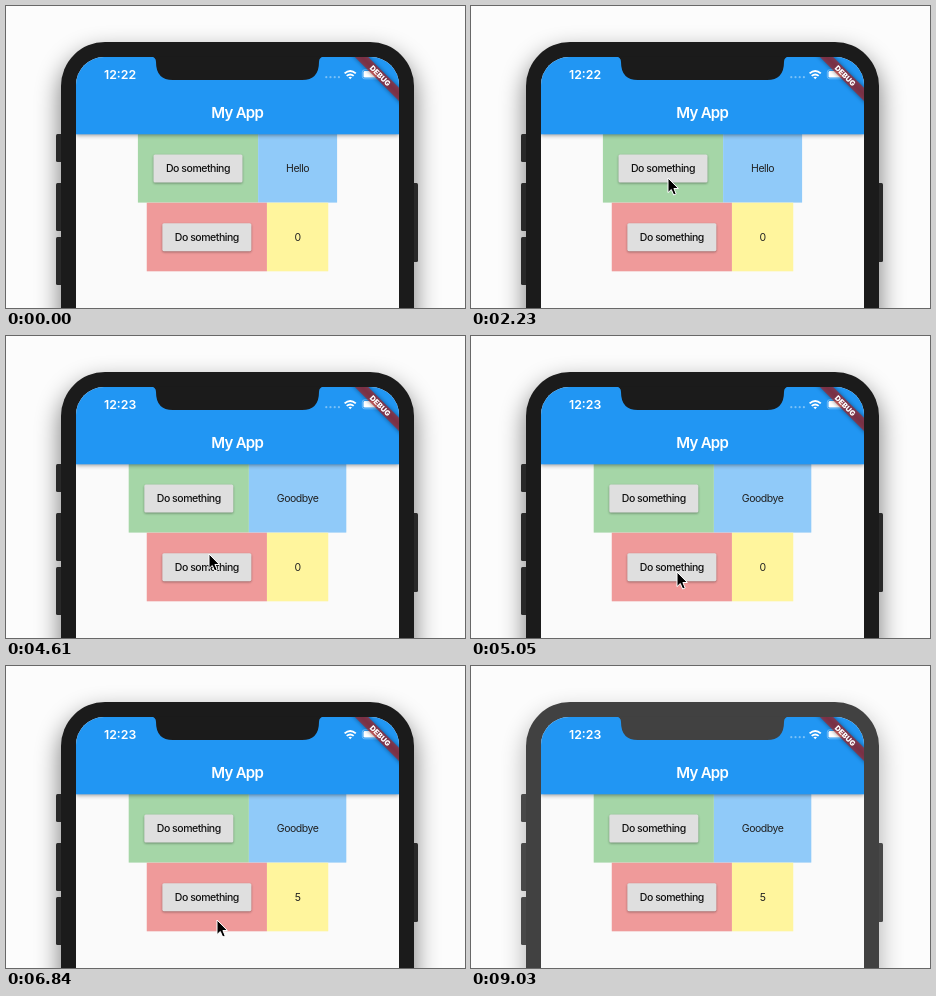
Recreate the animation shown at these times as an HTML page. Size 459 by 302 pixels, loop 9.13 s.

```html
<!DOCTYPE html>
<html lang="en">
<head>
<meta charset="utf-8">
<title>My App</title>
<style>
  html, body { margin: 0; width: 100%; height: 100%; overflow: hidden; background: #fcfcfc; }
  svg { display: block; width: 459px; height: 302px; font-family: Inter, Roboto, sans-serif; }
  text { text-anchor: middle; }
  .label { font-size: 10.5px; letter-spacing: -.47px; fill: #212121; }
  .button-label { font-weight: 500; fill: #111; }
  .button { fill: #dfdfdf; filter: drop-shadow(0 1px 1px rgba(0, 0, 0, .35)); }
  .title { font-size: 15px; font-weight: 600; letter-spacing: -.75px; fill: #fff; }
  .clock { font-size: 12.3px; font-weight: 600; fill: #fff; text-anchor: start; }
  .debug { font-size: 7.4px; font-weight: 900; fill: #fff; }
  .body { fill: #1b1b1b; }
  .key { fill: #292929; }
  .bar { filter: drop-shadow(0 1.5px 2px rgba(0, 0, 0, .4)); }
  .shadow { fill: #000; filter: blur(12px); opacity: .5; }
  .band { fill: #b71c1c; fill-opacity: .63; }
  .band-shadow { fill: #000; opacity: .45; filter: blur(2px); }
</style>
</head>
<body>
<svg viewBox="0 0 459 302">
  <defs>
    <clipPath id="screen"><rect x="70" y="51" width="323" height="300" rx="28"/></clipPath>
  </defs>

  <rect class="shadow" x="54" y="46" width="355" height="330" rx="44"/>
  <g id="keys">
    <rect class="key" x="50" y="128" width="8" height="28" rx="1.5"/>
    <rect class="key" x="50" y="177" width="8" height="48" rx="1.5"/>
    <rect class="key" x="50" y="231" width="8" height="48" rx="1.5"/>
    <rect class="key" x="404" y="177" width="8" height="79" rx="1.5"/>
  </g>
  <rect class="body" x="55" y="36" width="353" height="330" rx="44"/>

  <g clip-path="url(#screen)">
    <rect x="70" y="51" width="323" height="251" fill="#fafafa"/>
    <g id="rows"></g>
    <rect class="bar" x="70" y="51" width="323" height="77.3" fill="#2196f3"/>
    <text class="title" x="231.2" y="112">My App</text>
    <text class="clock" id="early" x="98" y="72.6">12:22</text>
    <text class="clock" id="late" x="98" y="72.6">12:23</text>

    <g id="dots" fill="#fff" fill-opacity=".4">
      <circle cx="320.3" cy="71.2" r="1.1"/><circle cx="324.5" cy="71.2" r="1.1"/>
      <circle cx="328.7" cy="71.2" r="1.1"/><circle cx="332.9" cy="71.2" r="1.1"/>
    </g>
    <g fill="none" stroke="#fff" stroke-width="1.9">
      <path d="M338.6 67.4q5.6-5 11.2 0M340.7 69.9q3.5-3 7 0"/>
      <path d="M342.4 71.3q1.8-1.3 3.6 0l-1.8 1.9z" fill="#fff" stroke="none"/>
    </g>
    <rect x="356.3" y="63.8" width="17.4" height="9" rx="2.4" fill="none" stroke="#fff" stroke-opacity=".45" stroke-width=".8"/>
    <rect x="357.5" y="65" width="13.5" height="6.6" rx="1.4" fill="#fff"/>

    <g transform="translate(393 51) rotate(45)">
      <rect class="band-shadow" x="-40" y="21.8" width="80" height="9.4"/>
      <rect class="band" x="-40" y="21.8" width="80" height="9.4"/>
      <text class="debug" x="0" y="29.2">DEBUG</text>
    </g>
  </g>
  <path class="body" d="M145 50.5q5 .5 5 5.5q0 18 17 18H296q17 0 17-18q0-5 5-5.5z"/>

  <path id="cursor" d="M0 0V14.6L3.3 11.5L5.7 17L8.2 15.9L5.9 10.5H10.4Z" fill="#000" stroke="#fff" stroke-width="1" stroke-linejoin="round"/>
</svg>

<script>
const LOOP = 9130;
const $ = id => document.getElementById(id);
const rowHeight = 68.6, cellWidth = 120.2;

// A centred row: a coloured cell with a button, then a cell with a value.
function addRow(id, y, color, valueColor, valueWidth, value) {
  const x = 231.5 - (cellWidth + valueWidth) / 2;
  const split = x + cellWidth, base = y + 38.2;
  $('rows').insertAdjacentHTML('beforeend', `<g id="${id}">
    <rect x="${x}" y="${y}" width="${cellWidth}" height="${rowHeight}" fill="${color}"/>
    <rect x="${split}" y="${y}" width="${valueWidth}" height="${rowHeight}" fill="${valueColor}"/>
    <rect class="button" x="${x + 15.6}" y="${y + 20.5}" width="89" height="28" rx="1.6"/>
    <text class="label button-label" x="${x + cellWidth / 2}" y="${base}">Do something</text>
    <text class="label" x="${split + valueWidth / 2}" y="${base}">${value}</text></g>`);
}

addRow('hello', 128, '#a5d6a7', '#90caf9', 79, 'Hello');
addRow('goodbye', 128, '#a5d6a7', '#90caf9', 97.4, 'Goodbye');
addRow('zero', 196.7, '#ef9a9a', '#fff59d', 61.3, '0');
addRow('five', 196.7, '#ef9a9a', '#fff59d', 61.3, '5');

// Holds each value until the next time in the table.
function hold(el, prop, table) {
  const frames = table.map(([ms, value]) => ({ offset: ms / LOOP, [prop]: value, easing: 'step-end' }));
  frames.push({ offset: 1, [prop]: table[table.length - 1][1] });
  el.animate(frames, { duration: LOOP, iterations: Infinity });
}

function swap(before, after, ms) {
  hold($(before), 'opacity', [[0, 1], [ms, 0]]);
  hold($(after), 'opacity', [[0, 0], [ms, 1]]);
}
swap('hello', 'goodbye', 3130);
swap('early', 'late', 4020);
swap('zero', 'five', 5490);

const idle = '#dfdfdf';
for (const id of ['hello', 'goodbye'])
  hold($(id).querySelector('.button'), 'fill',
    [[0, idle], [2980, '#d0d0d0'], [3130, '#c4c4c4'], [3270, '#bdbdbd'], [3420, idle]]);
for (const id of ['zero', 'five'])
  hold($(id).querySelector('.button'), 'fill',
    [[0, idle], [5340, '#d0d0d0'], [5490, '#c0c0c0'], [5640, '#ced2cf'], [5790, idle]]);

const path = [
  [0, 232, 340], [1500, 232, 286], [1650, 221, 248], [1790, 210, 215],
  [1940, 202, 192], [2080, 198, 177], [2230, 197, 172],
  [4310, 198, 179], [4460, 200, 198], [4610, 203, 218], [4750, 205, 229],
  [4900, 206, 234], [5050, 206, 236],
  [6840, 211, 254], [6990, 216, 340]
];
hold($('cursor'), 'transform', path.map(([ms, x, y]) => [ms, `translate(${x}px, ${y}px)`]));

hold($('dots'), 'opacity', [[0, 1], [2980, 0], [3420, 1], [5340, 0], [9030, 1]]);

// The phone body fades briefly at the end of the loop.
for (const el of document.querySelectorAll('.body'))
  hold(el, 'fill', [[0, '#1b1b1b'], [9030, '#414141']]);
for (const el of document.querySelectorAll('.key'))
  hold(el, 'fill', [[0, '#292929'], [9030, '#484848']]);
hold(document.querySelector('.shadow'), 'opacity', [[0, .5], [9030, .3]]);
</script>
</body>
</html>
```
